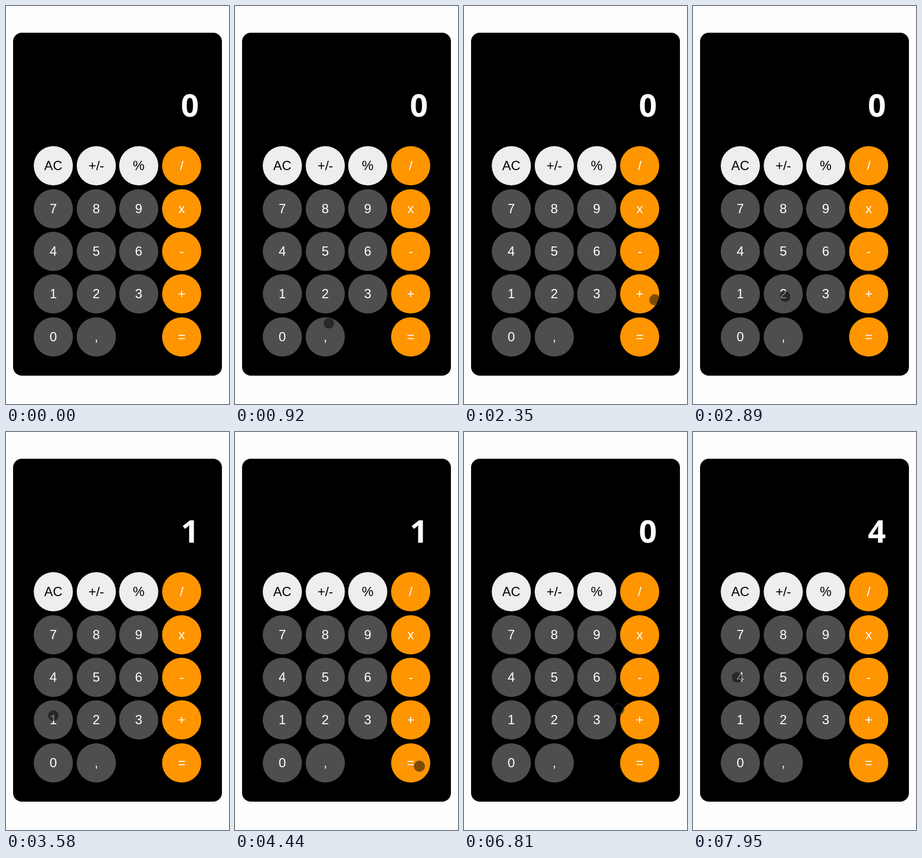
Animation of 410 by 730 pixels, one loop 8 s. Source, as an HTML page:

```html
<!DOCTYPE html>
<html lang="en">
<head>
<meta charset="utf-8">
<title>Calculator</title>
<style>
  html, body { margin: 0; width: 100%; height: 100%; overflow: hidden; background: #fdfdfd; }
  svg { display: block; }
  text { text-anchor: middle; fill: #fff; font: 24px "Liberation Sans", Arial, sans-serif; }
  .light circle { fill: #eee; }
  .light text { fill: #000; }
  .dark circle { fill: #4e4e4e; }
  .operator circle { fill: #ff9500; }
  #display { font: bold 58px "Open Sans", "Noto Sans", sans-serif; }
  #cursor { fill: rgba(0, 0, 0, .5); stroke: rgba(90, 90, 90, .35); stroke-width: 1.5; }
</style>
</head>
<body>
<svg width="410" height="730" viewBox="0 0 410 730">
  <rect x="13" y="49" width="384" height="629" rx="16"/>
  <text id="display" x="338" y="203"></text>
  <g id="keys"></g>
  <circle id="cursor" r="10"/>
</svg>
<script>
const DURATION = 8000;
const PITCH = 78.4;
const LABELS = ['AC +/- % /', '7 8 9 x', '4 5 6 -', '1 2 3 +', '0 ,  ='];

// Each press shows the next digit.
const DIGITS = '0101204';
const PRESSES = [1340, 2350, 3580, 4590, 6340, 7600];

// Cursor strokes; a lower pace starts faster, bow bends the path to its left.
const START = { begin: 520, x: 369, y: 712 };
const MOVES = [
  { begin: 520, end: 1140, x: 94, y: 530 },
  { begin: 1410, end: 2010, x: 351, y: 539, bow: 15 },
  { begin: 2350, end: 2550, x: 342, y: 536 },
  { begin: 2680, end: 3510, x: 87, y: 520, bow: 9, pace: .35 },
  { begin: 3840, end: 4440, x: 339, y: 613 },
  { begin: 4520, end: 4870, x: 327, y: 607 },
  { begin: 5520, end: 6080, x: 320, y: 524, bow: 18, pace: .35 },
  { begin: 6740, end: 7270, x: 76, y: 446, bow: -8, pace: .7 },
  { begin: 7530, end: 7950, x: 81, y: 450 }
];

const display = document.getElementById('display');
const cursor = document.getElementById('cursor');
const smooth = u => u * u * (3 - 2 * u);

document.getElementById('keys').innerHTML = LABELS.map((line, row) =>
  line.split(' ').map((label, col) => {
    if (!label) return '';
    const type = col === 3 ? 'operator' : row === 0 ? 'light' : 'dark';
    const x = Math.round(87.4 + col * PITCH), y = Math.round(293.2 + row * PITCH);
    return `<g class="${type}" transform="translate(${x} ${y})">
      <circle r="36"/><text y="7.5">${label}</text></g>`;
  }).join('')).join('');

function cursorAt(time) {
  const i = MOVES.findLastIndex(move => move.begin <= time);
  const from = MOVES[i - 1] || START;
  const { begin, end, x, y, bow = 0, pace = 1 } = MOVES[i];
  const u = smooth(Math.min(1, (time - begin) / (end - begin)) ** pace);
  const dx = x - from.x, dy = y - from.y;
  const bend = 4 * u * (1 - u) * bow / Math.hypot(dx, dy);
  return [from.x + dx * u + dy * bend, from.y + dy * u - dx * bend];
}

function draw() {
  const time = performance.now() % DURATION;
  display.textContent = DIGITS[PRESSES.filter(press => press <= time).length];

  const visible = time >= START.begin;
  cursor.style.display = visible ? '' : 'none';
  if (visible) {
    const [x, y] = cursorAt(time);
    cursor.setAttribute('cx', x);
    cursor.setAttribute('cy', y);
  }
  requestAnimationFrame(draw);
}
draw();
</script>
</body>
</html>
```
